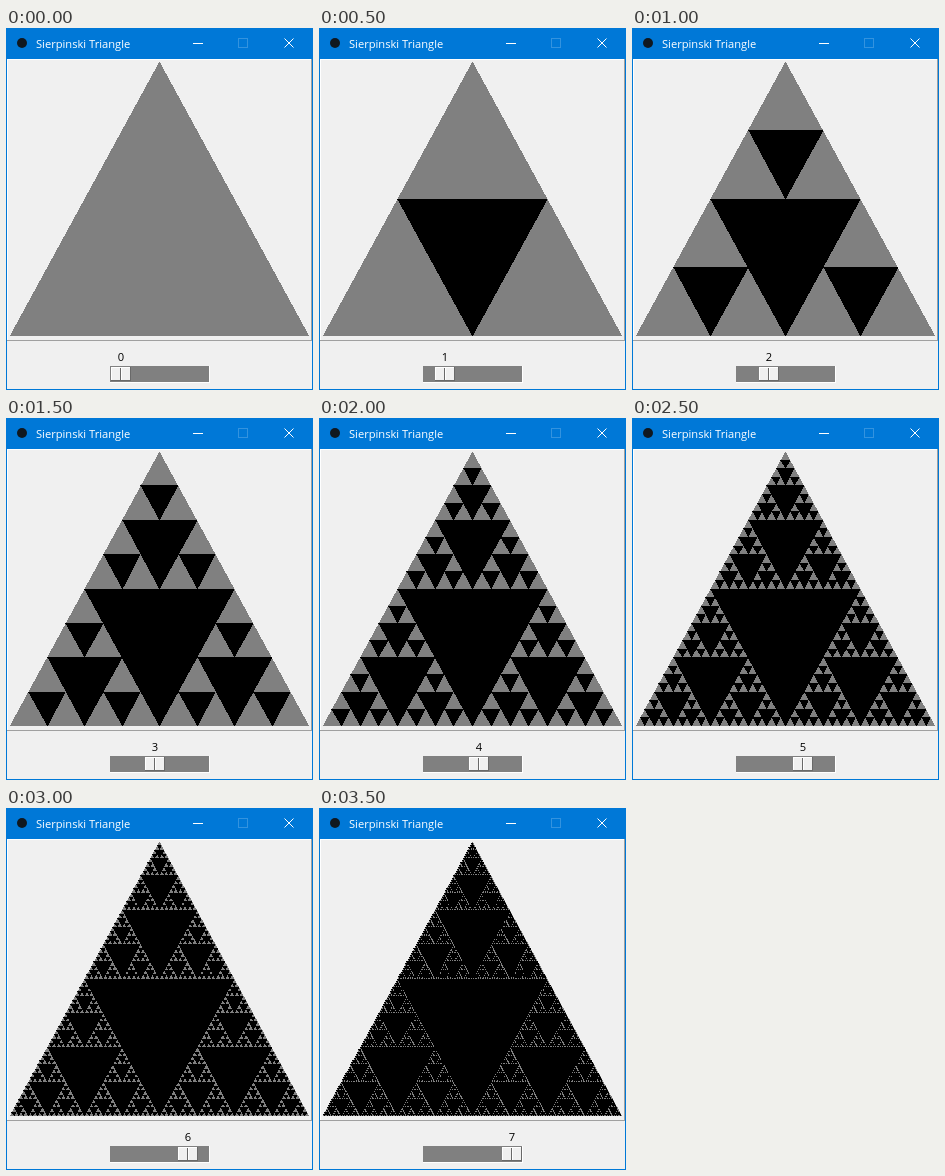
These frames come from a looping animation (307 px wide and 362 px high, 4 s). An HTML page:

```html
<!DOCTYPE html>
<html lang="en">
<head>
<meta charset="utf-8">
<title>Sierpinski Triangle</title>
<style>
  html, body { margin: 0; width: 100%; height: 100%; overflow: hidden; background: #f0f0f0; }
  svg { display: block; }
  .title { font: 11.15px "Open Sans", sans-serif; fill: #fff; }
  .value { font: 11.2px "Open Sans", sans-serif; text-anchor: middle; }
  .line { fill: none; stroke: #fff; }
  .crisp { shape-rendering: crispEdges; }
</style>
</head>
<body>
<svg width="307" height="362" viewBox="0 0 307 362">
  <rect width="307" height="362" fill="#0078d7"/>
  <rect x="1" y="31" width="305" height="330" fill="#f0f0f0"/>

  <circle cx="16" cy="15" r="5" fill="#101820"/>
  <text class="title" x="30" y="20">Sierpinski Triangle</text>
  <path class="line" d="M187 15.5h10M278.5 10.5l9 9m0 -9l-9 9"/>
  <rect class="line" x="232.5" y="10.5" width="9" height="9" style="stroke:#3393df"/>

  <g class="crisp">
    <path class="line" d="M1.5 313V31.5H306"/>
    <path class="line" d="M1 312.5H305.5V31" style="stroke:#a0a0a0"/>
    <g transform="translate(.49 .49)">
      <path d="M153 33L3 308H303Z" fill="#808080"/>
      <path id="holes"/>
    </g>
    <rect x="104" y="338" width="100" height="17" fill="#fff"/>
    <rect x="104" y="338" width="99" height="16" fill="#808080"/>
    <g id="thumb">
      <rect x="105" y="339" width="20" height="14" fill="#696969"/>
      <rect x="105" y="339" width="19" height="13" fill="#fff"/>
      <rect x="106" y="340" width="18" height="12" fill="#f0f0f0"/>
      <rect x="114" y="340" width="1" height="12" fill="#696969"/>
      <rect x="115" y="340" width="1" height="12" fill="#fff"/>
    </g>
  </g>
  <text class="value" id="value" y="333"></text>
</svg>
<script>
const holes = document.getElementById('holes');
const thumb = document.getElementById('thumb');
const value = document.getElementById('value');

const middle = (p, q) => [(p[0] + q[0]) / 2, (p[1] + q[1]) / 2];

// Path of all inverted triangles cut out down to the given depth
function cut(top, left, right, depth) {
  if (!depth) return '';
  const a = middle(top, left), b = middle(top, right), c = middle(left, right);
  const hole = [a, b, c].map(p => p.map(Math.round).join(' ')).join('L');
  return `M${hole}Z` + cut(top, a, b, depth - 1)
    + cut(a, left, c, depth - 1) + cut(b, c, right, depth - 1);
}

let shown = -1;
function draw() {
  const level = Math.floor(performance.now() / 500) % 8;
  if (level !== shown) {
    shown = level;
    const shift = Math.round(level * 11.2);
    holes.setAttribute('d', cut([153, 33], [3, 308], [303, 308], level));
    thumb.setAttribute('transform', `translate(${shift})`);
    value.setAttribute('x', 115 + shift);
    value.textContent = level;
  }
  requestAnimationFrame(draw);
}
draw();
</script>
</body>
</html>
```
